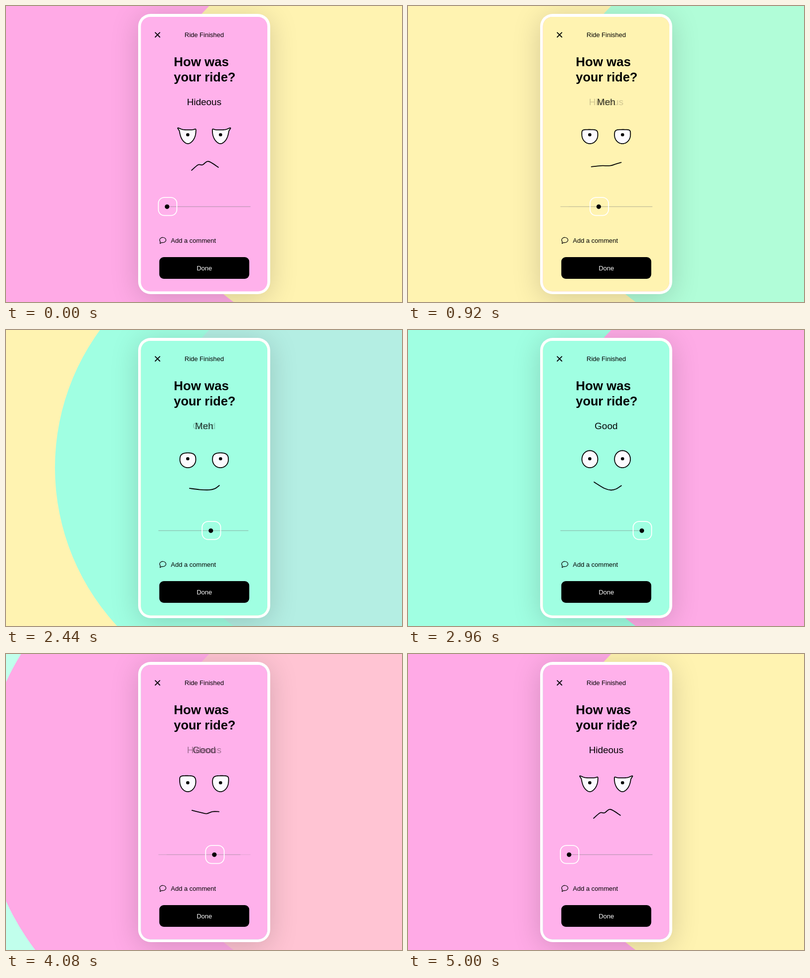
Write an HTML page with a canvas that moves like this. It is 800 by 600 pixels and loops after 5040 ms.

```html
<!DOCTYPE html>
<html lang="en">
<head>
<meta charset="utf-8">
<title>Ride rating</title>
<style>
  html, body { margin: 0; height: 100%; overflow: hidden; }
  canvas { display: block; }
</style>
</head>
<body>
<canvas id="stage" width="800" height="600"></canvas>
<script>
const ctx = document.getElementById('stage').getContext('2d');
const LOOP = 5040, DURATION = 800, STARTS = [340, 2210, 3760];
const FONT = '"Liberation Sans", Arial, sans-serif';

// eye: mid = height of the widest point, top = lid height, square = lid exponent, horn = corner pull
const MOODS = [
  { label: 'Hideous', back: '#ffaae6', screen: '#ffb1eb', knob: 325.4,
    eye: { mid: 256, top: 4.5, square: 0.4, horn: 6 },
    mouth: [[375, 333], [388, 322], [397, 322], [409, 315], [429, 327]] },
  { label: 'Meh', back: '#fff3b1', screen: '#fff3b1', knob: 398.8,
    eye: { mid: 263.2, top: 12.8, square: 0.65, horn: 0 },
    mouth: [[369.5, 324.2], [390, 324.2], [411, 324], [422, 321.5], [431, 315]] },
  { label: 'Good', back: '#a0ffe2', screen: '#a0ffe2', knob: 473.2,
    eye: { mid: 261.8, top: 17.4, square: 1, horn: 0 },
    mouth: [[376, 308], [397, 321], [410, 324.5], [421, 322], [431, 315.5]] }
];

const mix = (a, b, p) => a + (b - a) * p;
const power = (v, e) => Math.sign(v) * Math.abs(v) ** e;
const bump = d => Math.exp(-((d / 0.5) ** 2));

function disc(x, y, r, color, alpha = 1) {
  ctx.globalAlpha = alpha;
  ctx.fillStyle = color;
  ctx.beginPath();
  ctx.arc(x, y, r, 0, 2 * Math.PI);
  ctx.fill();
  ctx.globalAlpha = 1;
}

function box(x, y, w, h, r) {
  ctx.beginPath();
  ctx.roundRect(x, y, w, h, r);
}

function stroke(color, width) {
  ctx.strokeStyle = color;
  ctx.lineWidth = width;
  ctx.stroke();
}

function line(x1, y1, x2, y2, color, width) {
  ctx.beginPath();
  ctx.moveTo(x1, y1);
  ctx.lineTo(x2, y2);
  stroke(color, width);
}

function text(str, x, y, size, align = 'center', color = '#000', weight = '') {
  ctx.font = `${weight} ${size}px ${FONT}`;
  ctx.textAlign = align;
  ctx.fillStyle = color;
  ctx.fillText(str, x, y);
}

function drawBackdrop(from, to, after, p) {
  ctx.fillStyle = '#fff';
  ctx.fillRect(0, 0, 800, 600);
  ctx.globalAlpha = to === MOODS[0] ? 1 - p : 1;
  ctx.fillStyle = from.back;
  ctx.fillRect(0, 0, 800, 600);
  disc(690 - 583 * p, 279, 395 + 388 * p, to.back);
  disc(690, 279, 395, after.back, p);
}

function drawPhone(from, to, p) {
  ctx.save();
  ctx.shadowColor = 'rgba(0,0,0,.17)';
  ctx.shadowBlur = 56;
  ctx.shadowOffsetY = 8;
  ctx.fillStyle = '#fff';
  box(267, 16, 266.7, 568, 25);
  ctx.fill();
  ctx.restore();

  ctx.save();
  box(272.5, 22, 255.5, 556.5, 19);
  ctx.clip();
  ctx.fillStyle = from.screen;
  ctx.fillRect(267, 16, 267, 568);
  if (p > 0) disc(940, 300, 400 + 2000 * p, to.screen);
  ctx.restore();
}

function drawStatic() {
  line(301.5, 53.8, 310.7, 63, '#000', 1.8);
  line(310.7, 53.8, 301.5, 63, '#000', 1.8);
  text('Ride Finished', 400.5, 63.3, 13);
  text('How was', 339, 122, 26, 'left', '#000', 'bold');
  text('your ride?', 339, 153.3, 25.5, 'left', '#000', 'bold');

  ctx.beginPath();
  ctx.ellipse(316.8, 474.4, 6.4, 5.2, 0, 2.5, 1.9 + 2 * Math.PI);
  ctx.lineTo(311.2, 481.5);
  ctx.closePath();
  stroke('#000', 1.2);
  text('Add a comment', 333, 480, 13, 'left');

  ctx.fillStyle = '#000';
  box(309.7, 509, 181.7, 44, 9);
  ctx.fill();
  text('Done', 400.7, 536, 13, 'center', '#fff');
}

// A superellipse lid over a rounded lower half, with both upper corners pulled out by "horn".
function traceEye({ mid, top, square, horn }) {
  const steps = 120;
  ctx.beginPath();
  for (let i = 0; i < steps; i++) {
    const angle = (i / steps * 2 - 1) * Math.PI;
    const upper = Math.cos(angle) > 0;
    const e = upper ? square : 1 + horn / 50;
    const outer = horn * bump(angle + 0.85), inner = horn * bump(angle - 0.85);
    const x = 367.4 + 16 * power(Math.sin(angle), e) - outer + 0.2 * inner;
    const y = mid - (upper ? top : 279.1 - mid) * power(Math.cos(angle), e);
    ctx.lineTo(x, y - 0.85 * outer - 0.45 * inner);
  }
  ctx.closePath();
}

function traceCurve(points) {
  const at = i => points[Math.max(0, Math.min(points.length - 1, i))];
  ctx.beginPath();
  ctx.moveTo(...at(0));
  for (let i = 0; i < points.length - 1; i++) {
    const [a, b, c, d] = [at(i - 1), at(i), at(i + 1), at(i + 2)];
    ctx.bezierCurveTo(b[0] + (c[0] - a[0]) / 6, b[1] + (c[1] - a[1]) / 6,
      c[0] - (d[0] - b[0]) / 6, c[1] - (d[1] - b[1]) / 6, ...c);
  }
}

function drawFace(from, to, p) {
  const eye = {};
  for (const key in from.eye) eye[key] = mix(from.eye[key], to.eye[key], p);
  for (const side of [1, -1]) {
    ctx.save();
    ctx.translate(400.3, 0);
    ctx.scale(side, 1);
    ctx.translate(-400.3, 0);
    traceEye(eye);
    ctx.fillStyle = '#fcfaff';
    ctx.fill();
    stroke('#000', 1.8);
    disc(367.2, 261, 3.3, '#000');
    ctx.restore();
  }
  traceCurve(from.mouth.map(([x, y], i) => [mix(x, to.mouth[i][0], p), mix(y, to.mouth[i][1], p)]));
  stroke('#000', 1.8);
}

function drawLabels(from, to, p) {
  ctx.globalAlpha = 1 - p;
  text(from.label, 400.3, 201, 19);
  ctx.globalAlpha = p;
  text(to.label, 400.3, 201, 19);
  ctx.globalAlpha = 1;
}

function drawSlider(from, to, p) {
  const weight = mood => (from === mood ? 1 - p : 0) + (to === mood ? p : 0);
  const low = weight(MOODS[0]), high = weight(MOODS[2]);
  const track = 'rgba(120,125,125,.6)';
  ctx.globalAlpha = low;
  line(325, 406.8, 493.5, 406.8, track, 1.1);
  if (low < 1) {
    ctx.globalAlpha = 1 - low;
    line(308.3, 406.8, 493.3 - 20 * high / (1 - low), 406.8, track, 1.1);
  }
  ctx.globalAlpha = 1;
  const x = mix(from.knob, to.knob, p);
  box(x - 17.6, 388.2, 37.4, 36.4, 12);
  stroke('#fff', 1.8);
  disc(x, 406.8, 4.6, '#000');
}

function draw(t) {
  const i = Math.max(0, STARTS.filter(s => s <= t).length - 1);
  const u = Math.max(0, Math.min(1, (t - STARTS[i]) / DURATION));
  const p = u * u * (3 - 2 * u);
  const [from, to, after] = [0, 1, 2].map(k => MOODS[(i + k) % 3]);
  drawBackdrop(from, to, after, p);
  drawPhone(from, to, p);
  drawStatic();
  drawLabels(from, to, p);
  drawFace(from, to, p);
  drawSlider(from, to, p);
}

ctx.lineCap = ctx.lineJoin = 'round';
function tick() {
  draw(performance.now() % LOOP);
  requestAnimationFrame(tick);
}
tick();
</script>
</body>
</html>
```
